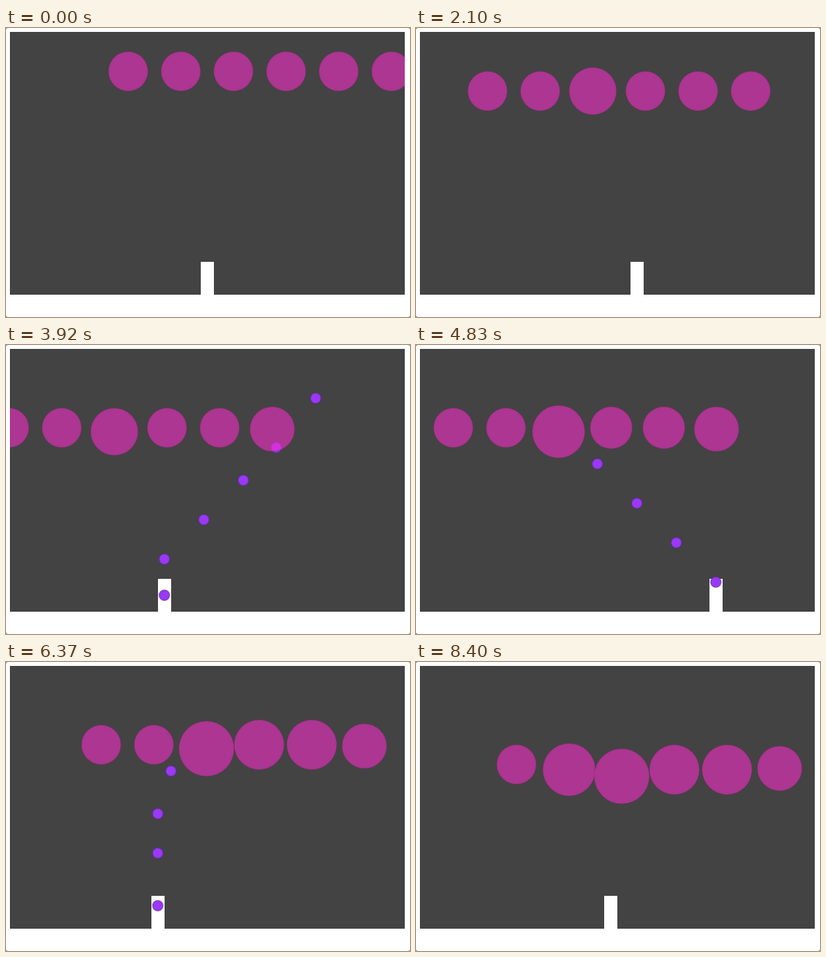
An HTML page with a canvas that plays this animation: 614 px wide and 440 px high, repeating every 8470 ms.

```html
<!DOCTYPE html>
<html lang="en">
<head>
<meta charset="utf-8">
<title>Water the flowers</title>
<style>
  html, body { margin: 0; width: 100%; height: 100%; overflow: hidden; background: #666; }
  canvas { display: block; background: #fff; border-radius: 3px; }
</style>
</head>
<body>
<canvas id="stage" width="614" height="440"></canvas>
<script>
const ctx = document.getElementById('stage').getContext('2d');
const LOOP = 8470, FRAME = 70, TICKS = 4;   // game ticks per picture
const W = 600, H = 400, DROP_R = 8, SPEED = 5;

// The player steers to a new place from a given tick on...
const moves = [[84, 330], [128, 465], [165, 235], [227, 450], [278, 225], [378, 290]];

// ...and fires in bursts: first tick, gap, count.
const bursts = [[24, 26, 2], [61, 12, 1], [148, 14.3, 3], [187, 11.8, 8], [282.7, 12.2, 6], [360, 36, 2]];
const shots = new Set(bursts.flatMap(([first, gap, count]) =>
  Array.from({ length: count }, (_, i) => Math.round(first + i * gap))));

function disc({ x, y, r }, fill, rim) {
  ctx.beginPath();
  ctx.arc(x - 0.3, y, r, 0, 2 * Math.PI);
  ctx.fillStyle = fill;
  ctx.fill();
  ctx.strokeStyle = rim;
  ctx.stroke();
}

function drawField() {
  ctx.fillStyle = '#434343';
  ctx.fillRect(0, 0, W, H);
  ctx.lineWidth = 1;
  ctx.strokeStyle = '#3b3b3b';
  ctx.strokeRect(0.5, 0.5, W - 1, H - 1);
}

function drawShip(x) {
  ctx.fillStyle = '#fff';
  ctx.fillRect(x - 10, H - 50, 20, 50);
}

function drawDrops(drops) {
  ctx.lineWidth = 2;
  for (const d of drops) disc(d, '#9b38f8', 'rgba(85, 45, 135, 0.45)');
}

function drawFlowers(flowers) {
  ctx.lineWidth = 1.5;
  for (const f of flowers) disc(f, 'rgba(247, 47, 201, 0.59)', 'rgba(110, 45, 95, 0.35)');
}

// Replays the game from its start up to the given tick, then paints it.
function render(tick) {
  const flowers = Array.from({ length: 6 }, (_, i) => ({ x: 180 + i * 80, y: 60, r: 30 }));
  let drops = [], dir = 1, ship = 300, goal = ship;

  for (let t = 0; t <= tick; t++) {
    ship += Math.sign(goal - ship) * SPEED;
    for (const [start, x] of moves) if (start === t) goal = x;
    if (shots.has(t)) drops.push({ x: ship, y: H - 20, r: DROP_R });

    if (t === tick) {
      drawField();
      drawShip(ship);
      drawDrops(drops);
    }

    for (const d of drops) {
      d.y -= SPEED;
      for (const f of flowers) {
        if (Math.hypot(d.x - f.x, d.y - f.y) < f.r + d.r) {
          f.r += 2;
          d.gone = true;
        }
      }
    }
    drops = drops.filter(d => !d.gone && d.y > -d.r);

    if (t === tick) drawFlowers(flowers);

    for (const f of flowers) f.x += dir;
    if (flowers.some(f => f.x > W || f.x < 0)) {
      dir = -dir;
      for (const f of flowers) f.y += f.r;
    }
  }
}

ctx.translate(6, 6);
ctx.beginPath();
ctx.rect(0, 0, W, H);
ctx.clip();

function loop() {
  const picture = Math.floor(performance.now() % LOOP / FRAME);
  render(Math.max(0, picture * TICKS - 1));
  requestAnimationFrame(loop);
}
loop();
</script>
</body>
</html>
```
